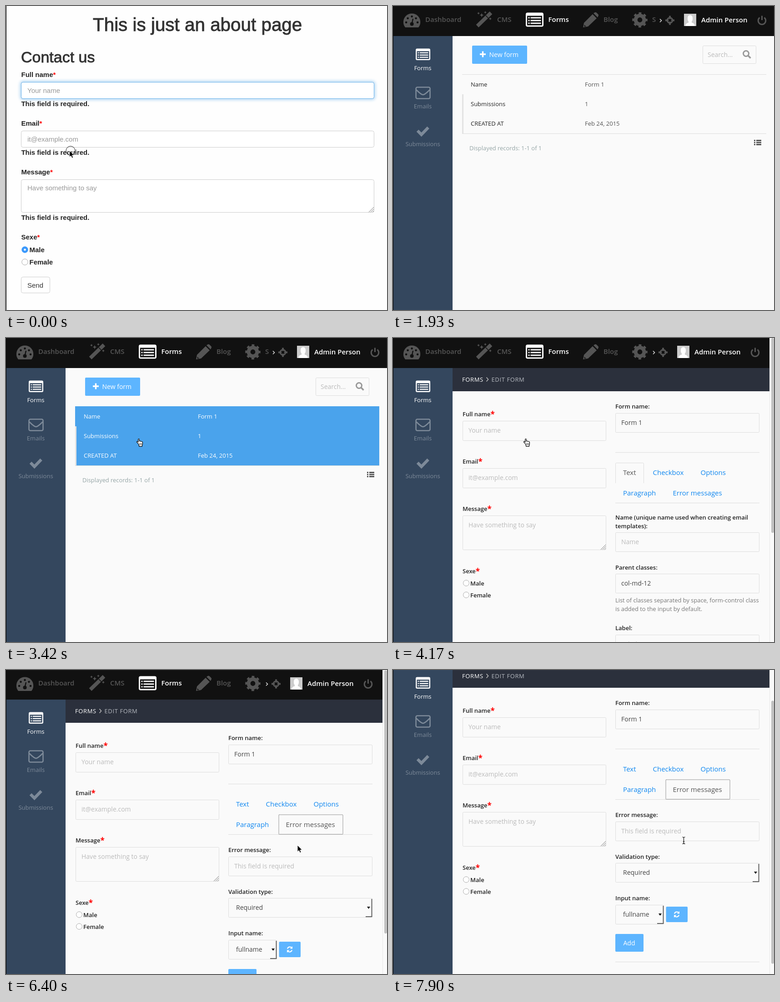
An HTML page for the animation above (8000 ms loop, 838 px wide and 668 px high).

```html
<!DOCTYPE html>
<html lang="en">
<head>
<meta charset="utf-8">
<title>Contact form walkthrough</title>
<style>
  html, body { margin: 0; width: 100%; height: 100%; overflow: hidden; background: #fefefe; }
  svg { display: block; width: 100vw; height: 100vh; }
  .helv { font-family: "Liberation Sans", Arial, sans-serif; }
  .open { font-family: "Open Sans", sans-serif; }
  .hover text { fill: #fff; }
</style>
</head>
<body>
<svg id="stage" viewBox="0 0 838 668"></svg>
<script>
const LOOP = 8000;
const EMAIL = 'it@example.com';

// ---- drawing helpers ----
const text = (x, y, str, size, fill, more = '') =>
  `<text x="${x}" y="${y}" font-size="${size}" fill="${fill}" ${more}>${str}</text>`;
const rect = (x, y, w, h, fill, more = '') =>
  `<rect x="${x}" y="${y}" width="${w}" height="${h}" fill="${fill}" ${more}/>`;
// bordered box given by its outer edges
const box = (x1, y1, x2, y2, fill, border, radius = 2, more = '') =>
  rect(x1 + .5, y1 + .5, x2 - x1 - 1, y2 - y1 - 1, fill, `stroke="${border}" rx="${radius}" ${more}`);
const rule = (x1, x2, y, fill = '#ddd') => rect(x1, y, x2 - x1, 1, fill);
const circle = (x, y, r, fill, more = '') => `<circle cx="${x}" cy="${y}" r="${r}" fill="${fill}" ${more}/>`;
const path = (d, fill, more = '') => `<path d="${d}" fill="${fill}" ${more}/>`;
const line = (d, color, width = 1, more = '') => path(d, 'none', `stroke="${color}" stroke-width="${width}" ${more}`);
const group = (body, more = '') => `<g ${more}>${body}</g>`;
const BOLD = 'font-weight="700"', SEMI = 'font-weight="600"';
const grip = (x, y) => line(`M${x - 11} ${y}l11-11M${x - 7} ${y}l7-7M${x - 3} ${y}l3-3`, '#777');

// ---- public contact page ----
function aboutPage() {
  const label = (y, str) => text(33.5, y, str + '<tspan fill="#f00">*</tspan>', 15, '#222', BOLD);
  const error = y => text(33.5, y, 'This field is required.', 14.9, '#222', BOLD);
  const hint = (y, str) => text(47, y, str, 15, '#999');
  const heading = (x, y, str, size) => text(x, y, str, size, '#333', 'stroke="#333" stroke-width=".9"');
  return rect(0, 0, 838, 668, '#fefefe')
    + heading(191, 55, 'This is just an about page', 40.4)
    + heading(33, 124, 'Contact us', 34)
    + label(156, 'Full name') + box(33, 167, 810, 204, '#fff', '#ccc', 4)
    + group(box(33, 167, 810, 204, 'none', '#66afe9', 4, 'stroke-width="5" opacity=".6" style="filter:blur(3px)"')
      + box(33, 167, 810, 204, '#fff', '#66afe9', 4), 'id="focus"')
    + hint(191, 'Your name') + error(219.5)
    + label(263, 'Email') + box(33, 274, 810, 311, '#fff', '#ccc', 4) + hint(298, EMAIL)
    + rect(33, 311, 150, 20, '#b3d7ff', 'id="selection"') + error(326.5)
    + label(370, 'Message') + box(33, 381, 810, 454, '#fff', '#ccc', 4) + grip(809, 453)
    + hint(405, 'Have something to say') + error(470)
    + label(513, 'Sexe')
    + circle(41.5, 535.5, 7.2, '#3b99fc') + circle(41.5, 535.5, 2.3, '#fff') + text(51.5, 540.5, 'Male', 15, '#222', BOLD)
    + circle(41.5, 562.5, 6.7, '#fff', 'stroke="#aaa"') + text(51.5, 568, 'Female', 15, '#222', BOLD)
    + box(33, 595, 97, 631, '#fff', '#ccc', 4) + text(47, 618.5, 'Send', 15, '#333');
}

// ---- admin frame: top bar and sidebar ----
const listIcon = (x, y, scale, back) => group(
  rect(0, 0, 39, 31, '#fff', 'rx="4"') + rect(3, 7, 33, 21, back)
  + [10, 16, 22].map(row => rect(5.5, row, 3, 2.8, '#fff') + rect(10.5, row, 23, 2.8, '#fff')).join(''),
  `transform="translate(${x} ${y}) scale(${scale})"`);

const star = (x, y, r) => path(`M${x} ${y - r}L${x + r * .3} ${y - r * .3} ${x + r} ${y} ${x + r * .3} ${y + r * .3} ${x} ${y + r} ${x - r * .3} ${y + r * .3} ${x - r} ${y} ${x - r * .3} ${y - r * .3}Z`, '#555');

function adminFrame() {
  const grey = '#555', bar = '#111', side = '#34475e', muted = '#7d8a99';
  const item = (x, str, fill = grey, y = 35) => text(x, y, str, 15, fill, SEMI);
  const centered = (y, str, fill) => text(65.5, y, str, 13, fill, 'text-anchor="middle"');
  const gauge = path('M27 47A18.7 18.7 0 1 1 56 47Z', grey)
    + [[29, 36], [32.5, 27], [41.5, 23], [50.5, 27], [54, 36]].map(([x, y]) => circle(x, y, 2.3, bar)).join('')
    + line('M44 28L41.5 39', bar, 2.4) + circle(41.5, 39.5, 4, bar);
  const wand = line('M185.5 44L215.5 15', grey, 8) + line('M204 21L209.5 26.5', bar, 1.6)
    + star(188, 16, 3) + star(195, 20, 4.5) + star(203, 14, 3) + star(214, 28, 3.2);
  const pencil = path('M418 47L420 37 439 18 448 27 429 45ZM441 16L444 14Q446 13 448 15L451 18Q453 20 451 23L450 25Z', grey)
    + path('M420.5 41L424.5 45 421 45.5Z', bar);
  const gear = circle(543, 30.5, 9.4, 'none', `stroke="${grey}" stroke-width="8"`)
    + circle(543, 30.5, 14.5, 'none', `stroke="${grey}" stroke-width="4.5" stroke-dasharray="5.69" stroke-dashoffset="2.85"`);
  const account = line('M587 28.5l3.5 3.5-3.5 3.5', '#ddd', 1.6)
    + circle(609, 31.5, 5.8, 'none', `stroke="${grey}" stroke-width="3"`)
    + line('M609 21.5v7M609 34.5v7M599 31.5h7M612 31.5h7', grey, 4)
    + rect(640, 17, 27, 27, '#ccc')
    + path('M643 44Q643 38 650 36.5L650 34Q647.5 31 648 26 648.5 20 653.5 20 658.5 20 659 26 659.5 31 657 34L657 36.5Q664 38 664 44Z', '#fff')
    + item(678, 'Admin Person', '#fff', 36)
    + line('M806.5 25.5A8.3 8.3 0 1 0 816.5 25.5M811.5 21.5V31', grey, 3);
  return rect(0, 0, 838, 900, '#fafafa') + rect(0, 0, 838, 66, bar) + rect(0, 66, 131, 834, side)
    + gauge + item(71, 'Dashboard') + wand + item(229, 'CMS')
    + listIcon(292, 14.5, 1, bar) + item(341.5, 'Forms', '#fff')
    + pencil + item(463, 'Blog') + gear + group(item(570, 'S'), 'id="clipped"') + group(account, 'id="account"')
    + listIcon(50, 93.5, .82, side) + centered(141, 'Forms', '#fff')
    + box(50, 178, 82, 204, 'none', muted, 3, 'stroke-width="2.6"') + line('M51 184Q62 195 66 195 70 195 81 184', muted, 2.6)
    + centered(225, 'Emails', muted)
    + line('M54 274L62.5 282.5 77.5 267', muted, 6.5) + centered(308, 'Submissions', muted);
}

// ---- list of forms ----
function formList() {
  const row = (y, key, value) => text(171, y, key, 13, '#222') + text(422, y, value, 13, '#555');
  return rect(174, 87, 121, 40, '#5db5ff', 'rx="2"') + line('M191 106h13M197.5 99.5v13', '#fff', 3.4)
    + text(211.5, 111.5, 'New form', 14, '#fff')
    + box(681, 87, 799, 127, '#fafafa', '#ddd') + text(692, 111.5, 'Search...', 14, '#bbb')
    + circle(776.5, 104.5, 6, 'none', 'stroke="#999" stroke-width="3"') + line('M781 109l5.5 5.5', '#999', 3.6)
    + rule(152, 821, 150) + rule(152, 821, 280) + rect(152, 194, 3, 86, '#e3e3e3')
    + path('M152 150H821V280H155V194H152Z', '#4aa3ec', 'id="highlight"')
    + group(row(177, 'Name', 'Form 1') + row(219.5, 'Submissions', '1') + row(263, 'CREATED AT', 'Feb 24, 2015'), 'id="rows"')
    + text(168, 316.5, 'Displayed records: 1-1 of 1', 12.9, '#95a5a6')
    + [294, 298.5, 303].map(y => rect(794, y, 3, 3, '#555') + rect(799, y, 11, 3, '#555')).join('');
}

// ---- form editor ----
function editor() {
  const bg = '#fafafa';
  const label = (x, y, str) => text(x, y, str, 13, '#222', SEMI);
  const needed = (y, str) => label(153, y, str + '<tspan fill="#f00" font-size="17" font-weight="700" dy="2">*</tspan>');
  const field = (x1, y1, x2, y2, str, fill = '#bbb') =>
    box(x1, y1, x2, y2, bg, '#ddd') + text(x1 + 13, y1 + 26, str, 14, fill);
  const select = (y, right, str) => box(489, y, right, y + 43, bg, '#ddd') + text(506, y + 26, str, 14, '#444')
    + line(`M${right - 1.5} ${y + 2}V${y + 41}H${right - 15}`, '#666', 2)
    + path(`M${right - 12} ${y + 19}h7l-3.5 5z`, '#111');
  const radio = (y, str) => circle(161, y, 6.5, '#fff', 'stroke="#aaa"') + label(170, y + 5, str);
  const tab = (x, y, str, id) => text(x, y, str, 15, '#0f87f0', `id="${id}"`);
  const refresh = line('M619 613.5A5.5 5.5 0 0 1 628.5 611.5M629 616.5A5.5 5.5 0 0 1 619.5 618.5', '#fff', 2.2)
    + path('M630 608v5.5h-5.5zM618 622v-5.5h5.5z', '#fff');

  const textPanel = label(489, 398.5, 'Name (unique name used when creating email') + label(489, 417.5, 'templates):')
    + field(489, 427, 806, 470, 'Name') + label(489, 508.5, 'Parent classes:')
    + field(489, 518, 806, 561, 'col-md-12', '#444')
    + text(489, 580.5, 'List of classes separated by space, form-control class', 12.9, '#777')
    + text(489, 599.5, 'is added to the input by default.', 12.9, '#777')
    + label(489, 642, 'Label:') + field(489, 652, 806, 695, 'Label');
  const errorPanel = label(489, 400.5, 'Error message:') + field(489, 411, 806, 454, 'This field is required')
    + label(489, 492.5, 'Validation type:') + select(502, 806, 'Required')
    + label(489, 583.5, 'Input name:') + select(594, 596, 'fullname')
    + rect(600.5, 598, 47.5, 34, '#5db5ff', 'rx="2"') + refresh
    + rect(489, 658, 62, 39, '#5db5ff', 'rx="2"') + text(506.5, 682.5, 'Add', 14, '#fff')
    + rule(489, 806, 719);

  return rect(131, 66, 697, 51, '#2b303c')
    + text(152, 95.5, 'FORMS', 13, '#fff', 'letter-spacing=".6"') + line('M205.5 86.5l4 4.5-4 4.5', '#bbb', 1.6)
    + text(216.5, 95.5, 'EDIT FORM', 13, '#b5b9c0', 'letter-spacing=".6"')
    + needed(172, 'Full name') + field(153, 182, 469, 226, 'Your name')
    + needed(276, 'Email') + field(153, 286, 469, 330, EMAIL)
    + needed(380, 'Message') + field(153, 390, 469, 466, 'Have something to say') + grip(468, 465)
    + needed(517, 'Sexe') + radio(538.5, 'Male') + radio(564.5, 'Female')
    + label(489, 155, 'Form name:') + field(489, 165, 806, 208, 'Form 1', '#444')
    + rule(489, 806, 251) + rule(489, 806, 362)
    + line('M489.5 319V276.5q0-2 2-2H549.5q2 0 2 2V319', '#ddd', 1, 'id="textTabBox"')
    + box(599.5, 318.5, 741.5, 362.5, bg, '#333', 1, 'stroke-dasharray="1 1" id="errorTabBox"')
    + tab(506, 301, 'Text', 'textTab') + tab(571.5, 301, 'Checkbox', 'checkTab') + tab(676.5, 301, 'Options', 'optionTab')
    + tab(506, 346, 'Paragraph', 'paraTab') + tab(615.5, 346, 'Error messages', 'errorTab')
    + group(textPanel, 'id="textPanel"') + group(errorPanel, 'id="errorPanel"');
}

// ---- pointers, hot spot at 0,0 ----
const pointers = {
  arrow: path('M0 0V14.5L3.3 11.4 5.6 16.6 8.2 15.5 6 10.4H10.3Z', '#000', 'stroke="#fff"'),
  hand: path('M-1.2 10.6L-4 7.8C-5.2 6.6-4 5.2-2.6 6L-1.2 7.2V1.2C-1.2-.4 1.2-.4 1.2 1.2V5.6C1.2 4.6 3.8 4.6 3.8 6 3.8 5.2 6.2 5.3 6.2 6.6 6.2 5.9 8.4 6.1 8.4 7.6V11.1C8.4 13.1 7.3 13.6 7.3 16.6H.8C.8 14.1-.2 13.1-1.2 10.6Z', '#fff', 'stroke="#000" stroke-width="1.2"')
    + line('M1.8 9.5v4M4 9.5v4M6.2 9.5v4', '#000', .8),
  beam: line('M-3-7.5Q0-7.5 0-5.5 0-7.5 3-7.5M0-6V6M-3 7.5Q0 7.5 0 5.5 0 7.5 3 7.5M-1.8 2.5H1.8', '#000', 1.1)
};

const $ = id => document.getElementById(id);
$('stage').innerHTML =
  group(aboutPage(), 'id="about" class="helv"')
  + group(group(adminFrame() + group(formList(), 'id="list"') + group(editor(), 'id="edit"'), 'id="scroller"'), 'id="admin" class="open"')
  + group(rect(828, 0, 10, 668, '#fafafa') + rect(828, 0, 1, 668, '#e8e8e8') + rect(832, 0, 6, 428, '#c1c1c1', 'rx="3" id="thumb"'), 'id="scrollbar"')
  + rect(0, 0, 1, 668, '#000')
  + group(circle(2.5, .5, 10, 'none', 'stroke="#222" id="ring"')
    + Object.entries(pointers).map(([name, art]) => group(art, `id="${name}"`)).join(''), 'id="pointer"');

// ---- timeline: [start ms, ...] held until the next entry ----
const pointerSteps = [
  [0, 'arrow', 139.5, 317.5, 1], [150, 'arrow', 184, 320, 1], [300, 'arrow', 108, 320, 1], [450, 'arrow', 28.5, 320, 1],
  [750, 'arrow', 62, 302], [900, 'arrow', 250, 238], [1050, 'arrow', 498, 165], [1190, 'arrow', 526, 28], [1340, ''],
  [2530, 'arrow', 512, 101], [2680, 'hand', 462, 155], [2830, 'hand', 400, 190], [2980, 'hand', 345, 210],
  [3120, 'hand', 312, 219], [3270, 'hand', 296, 221], [3420, 'hand', 292, 221.5],
  [4620, 'arrow', 390, 238], [4770, 'arrow', 560, 285], [4920, 'hand', 700, 330], [5060, 'hand', 678, 347], [5360, 'hand', 678, 347, 1],
  [5650, 'hand', 678, 347], [6100, 'arrow', 668, 364], [6250, 'arrow', 647, 381], [6400, 'arrow', 641, 385],
  [6700, 'arrow', 641, 381], [6850, 'arrow', 641, 377], [7750, 'beam', 640, 375], [7900, 'beam', 639.5, 374.5]
];
const scrollSteps = [[0, 0], [6400, 1], [6550, 22], [6700, 52], [6850, 72], [7000, 78]];
const selectionSteps = [[0, 183], [300, 108], [450, 33]];
const held = (steps, t) => steps.filter(step => step[0] <= t).pop();
const show = (id, on) => $(id).style.display = on ? '' : 'none';

function draw(t) {
  const admin = t >= 1930, editing = t >= 4170, pressed = t >= 5360, errors = t >= 5650;
  const hover = t >= 2680 && !editing;
  show('about', !admin);
  show('admin', admin);
  show('list', !editing);
  show('edit', editing);
  show('scrollbar', editing);
  show('clipped', !editing);
  $('account').setAttribute('transform', `translate(${editing ? -15 : 0})`);

  show('focus', t < 150);
  const left = held(selectionSteps, t)[1];
  $('selection').setAttribute('x', left);
  $('selection').setAttribute('width', 183 - left);

  show('highlight', hover);
  $('rows').classList.toggle('hover', hover);

  show('textTabBox', !errors);
  show('errorTabBox', pressed);
  $('errorTabBox').setAttribute('fill', errors ? '#fafafa' : '#eee');
  $('textTab').setAttribute('fill', errors ? '#0f87f0' : '#555');
  $('errorTab').setAttribute('fill', errors ? '#555' : t >= 5060 ? '#24405f' : '#0f87f0');
  show('textPanel', !errors);
  show('errorPanel', errors);

  const scroll = held(scrollSteps, t)[1], pageHeight = errors ? 772 : 1042;
  $('scroller').setAttribute('transform', `translate(0 ${-scroll})`);
  $('thumb').setAttribute('y', scroll * 668 / pageHeight);
  $('thumb').setAttribute('height', 668 * 668 / pageHeight);

  const [, kind, x = 0, y = 0, ring] = held(pointerSteps, t);
  for (const name in pointers) show(name, name === kind);
  show('ring', ring);
  $('pointer').setAttribute('transform', `translate(${x} ${y})`);
}

const start = performance.now();
function tick() {
  draw((performance.now() - start) % LOOP);
  requestAnimationFrame(tick);
}
tick();
</script>
</body>
</html>
```
